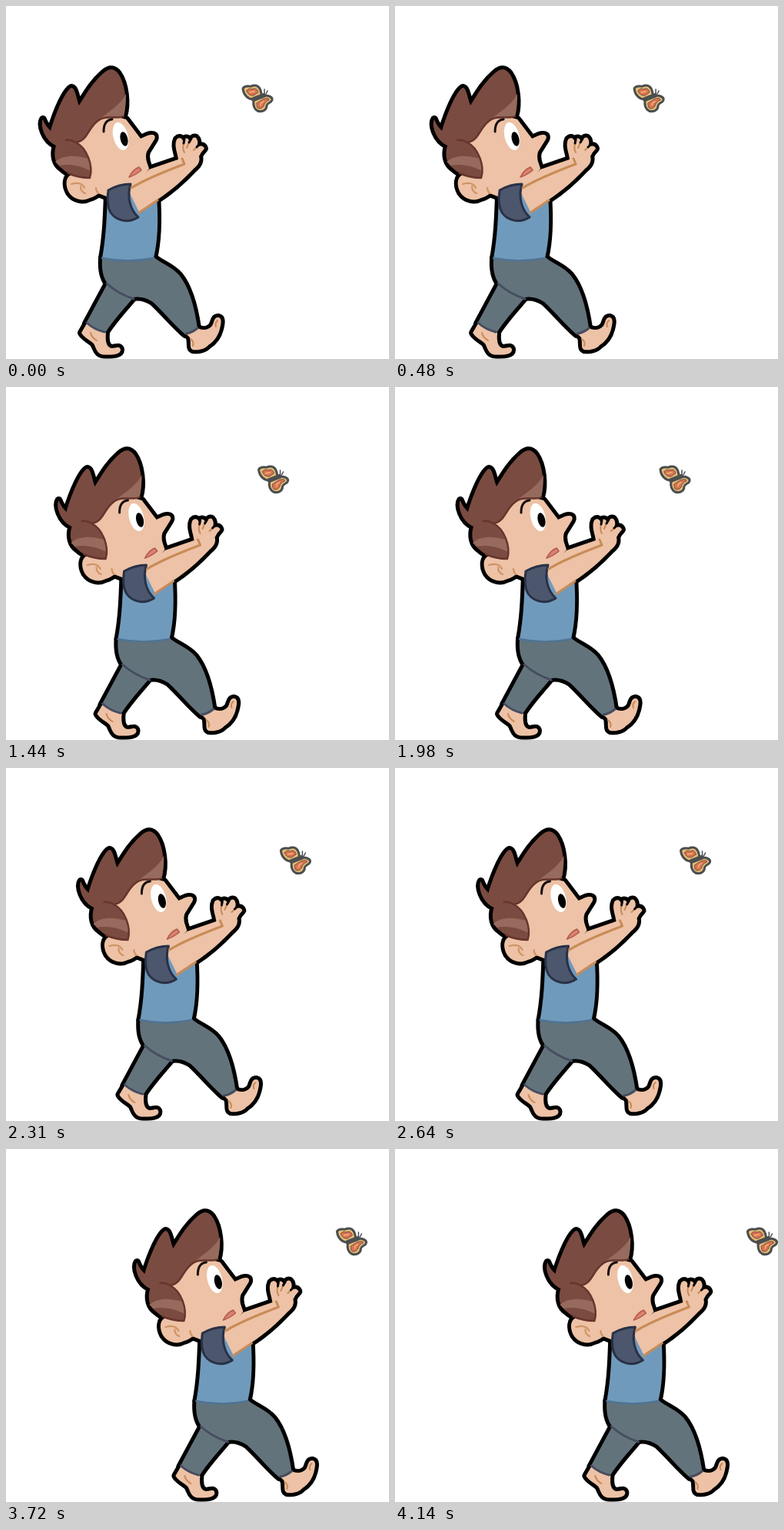
These frames come from a looping animation (498 by 458 pixels, 4170 ms). An HTML page:

```html
<!DOCTYPE html>
<html lang="en">
<head>
<meta charset="utf-8">
<title>Chasing a butterfly</title>
<style>
html, body { margin: 0; width: 100%; height: 100%; overflow: hidden; background: #fff; }
svg { display: block; }
</style>
</head>
<body>
<svg width="498" height="458" viewBox="0 0 498 458" stroke-linecap="round" stroke-linejoin="round">
<defs>
  <g id="body">
    <g fill="#edc2a6">
      <path d="M105 412L98 424C101 430 109 433 114 438C118 445 118 453 130 452.500C139 453 149 452 149 446C148 440 143 444 137 444C130 442 129 434 130 424Z"/>
      <path d="M233 424L239 430C241 438 238 444 243 446C251 447 259 445 263 440C271 435 276 427 278 419C280 411 281 405 276 404C270 404 271 410 268 415C263 421 255 421 249 418Z"/>
    </g>
    <path fill="#63737b" d="M125 327C124 341 126 352 132 360L104 412Q115 421 129 424C140 407 153 393 166 378Q178 376 191 384C205 397 218 413 233 426Q242 424 249 418C245 390 238 365 225 349C215 338 203 335 192 326Z"/>
    <path fill="#709abb" d="M132 243C131 275 130 300 125 327Q158 334 192 327C198 302 198 276 196 246Z"/>
    <path fill="#edc2a6" d="M86 219C77 221 77 233 82 242C88 251 100 254 109 249Q116 247 120 243L133 248L165 238L186 211L183 202Q181 195 183 189L193 173C196 167 190 166 184 168L175 172L156 147L126 139L92 176Z"/>
    <path fill="#7a4b41" d="M48 147C44 153 49 174 65 181C61 194 64 205 73 211Q84 222 109 223C114 207 105 184 91 177C105 175 106 161 117 151C129 139 143 148 153 143C158 126 155 101 146 88C140 80 134 81 127 87C113 99 105 113 95 129C91 119 90 106 85 106C78 109 66 135 58 162C53 157 50 153 48 147Z"/>
    <path fill="#edc2a6" d="M158 237L186 212L224 199C223 190 218 181 222 173C226 169 230 172 231 178Q231 170 236 172Q239 174 238 177Q243 169 247 171Q251 175 248 183Q256 179 258 185Q253 190 251 195C253 202 249 207 244 211C231 225 214 240 197 251L173 267Z"/>
  </g>
</defs>
<g id="scene">
  <use href="#body" stroke="#000" stroke-width="10"/>
  <use href="#body"/>

  <!-- hair -->
  <path fill="#976a5e" d="M156 114C148 130 131 138 117 151C129 139 143 148 153 143Q156 130 156 114ZM64 202C76 192 92 194 107 198Q111 206 110 214C94 206 80 205 69 207Z"/>
  <g fill="none" stroke="#67352c" stroke-width="2.500">
    <path d="M153 143C143 148 129 139 117 151C106 161 105 175 91 177C105 184 114 207 109 223Q94 223 81 217"/>
    <path d="M91 177Q84 173 78 174"/>
  </g>

  <!-- face -->
  <ellipse cx="149" cy="169" rx="9.500" ry="18.500" fill="#fff" transform="rotate(-14 149 169)"/>
  <ellipse cx="153.500" cy="172.500" rx="4.800" ry="9.500" transform="rotate(-13 153.500 172.500)"/>
  <path fill="none" stroke="#160f0d" stroke-width="3" d="M127 163Q127 148 138 147"/>
  <path fill="#d98270" stroke="#b4594a" stroke-width="1.500" d="M160 222Q165 212 173 209L176 213Q169 219 160 222Z"/>
  <g fill="none" stroke="#cf9566" stroke-width="2.200">
    <path d="M85 231Q98 227 102 236M97 234Q97 241 103 243"/>
    <path d="M120 243Q117 240 117 236"/>
  </g>

  <!-- clothes -->
  <path fill="none" stroke="#4f7393" stroke-width="2.500" d="M125 327Q158 334 192 327"/>
  <g fill="none" stroke="#464d60" stroke-width="3">
    <path d="M131 360Q145 373 166 380"/>
    <path d="M105 411Q115 420 128 423M234 425Q242 424 249 418"/>
  </g>
  <path fill="#4c566d" stroke="#293146" stroke-width="3" d="M133 239Q147 231 162 231C157 247 161 264 172 274C158 283 143 278 136 268Q130 258 133 239Z"/>

  <!-- arms and feet details -->
  <g fill="none" stroke="#c98b57" stroke-width="3">
    <path d="M163 236Q182 224 232 205L229 198"/>
    <path d="M173 268L197 252"/>
    <path stroke-width="2" d="M231 178Q229 185 232 190M238 177L235 184M248 183L244 187"/>
    <path stroke-width="2" d="M110 424Q111 430 118 434M240 432Q245 436 243 441M275 408Q271 412 273 416"/>
  </g>
  <g fill="none" stroke="#000" stroke-width="3">
    <path d="M231 178L232 173M238 177L241 172M248 183L251 180"/>
  </g>

  <!-- butterfly -->
  <g stroke="#4b4e50" stroke-width="3">
    <path fill="#e7bd72" d="M308 107C311 102 316 105 319 104C326 101 331 105 332 114L334 118L321 121C315 121 309 116 308 107Z"/>
    <path fill="#e7bd72" d="M322 122L334 117C340 115 347 118 346 122C345 126 340 125 339 129C339 136 332 138 327 136C322 133 321 128 322 122Z"/>
    <path fill="none" stroke-width="6" d="M322 121L335 116"/>
    <path fill="none" stroke-width="1.500" d="M336 114L336 108M338 114L340 110"/>
  </g>
  <g fill="#df7053" stroke="#69564a" stroke-width="1">
    <path d="M313 110Q315 106 320 108Q326 105 328 112L322 116Q315 117 313 110Z"/>
    <path d="M326 126L334 121Q342 118 342 122Q336 124 335 130Q331 135 327 132Z"/>
  </g>
  <path fill="none" stroke="#e7bd72" stroke-width="1.500" d="M317 112L323 111M331 129Q331 125 335 124"/>
</g>
</svg>
<script>
const LOOP = 4170, STEP = 30;
const scene = document.getElementById("scene");

function draw(now) {
  const time = Math.floor((now % LOOP) / STEP) * STEP;
  const p = time / LOOP;
  const x = 10.5 * p + 142 * p * p; // accelerating drift to the right
  scene.setAttribute("transform", `translate(${x.toFixed(2)} 0)`);
  requestAnimationFrame(draw);
}
draw(0);
</script>
</body>
</html>
```
